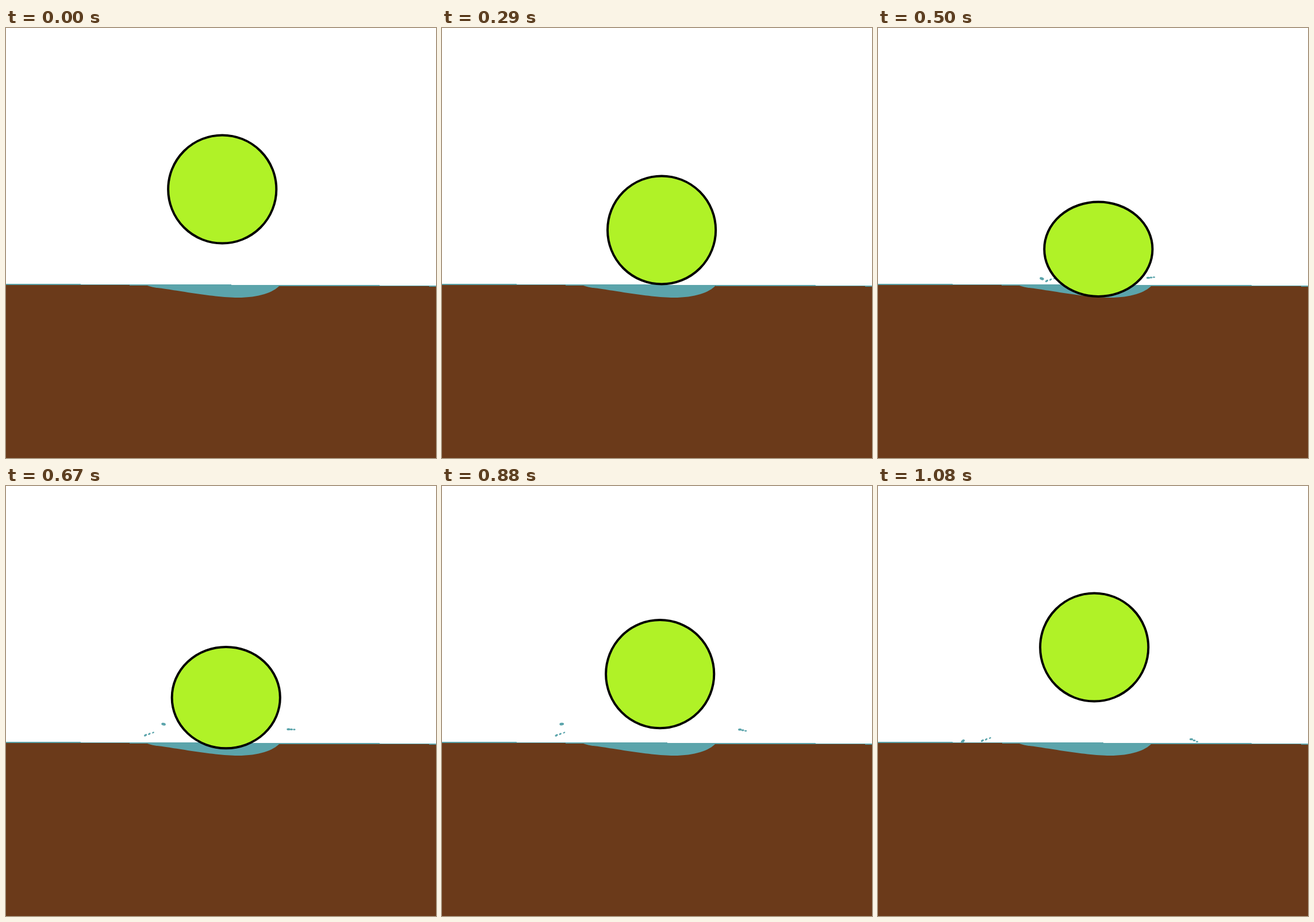
These frames come from a looping animation (748x748 px, 1120 ms). An HTML page:

```html
<!DOCTYPE html>
<html lang="en">
<head>
<meta charset="utf-8">
<title>Bouncing ball</title>
<style>
  html, body { margin: 0; width: 100%; height: 100%; overflow: hidden; background: #fff; }
  svg { display: block; width: 100vw; height: 100vh; }
  .water { fill: #5ba4ab; }
  .soil { fill: #6b3a1a; }
</style>
</head>
<body>
<svg viewBox="0 0 748 748">
  <g id="drops" class="water"></g>
  <g shape-rendering="crispEdges">
    <path class="soil" d="M0 446.68L748 449.56V748H0Z"/>
    <path class="water" d="M0 445L748 447.88V449.56L0 446.68Z"/>
  </g>
  <path class="water" d="M243 447Q252 450.5 262 452C276 452.5 360 469 403 469C440 469 465 460 476 448Z"/>
  <ellipse id="ball" rx="94.1" fill="#b0f227" stroke="#000" stroke-width="4"/>
</svg>
<script>
const LOOP = 1120, LAST = 26, MID = 13, SPLASH = 12;
const ball = document.getElementById('ball');
const layer = document.getElementById('drops');
const lerp = (a, b, u) => a + (b - a) * u;
const clamp = u => Math.min(1, Math.max(0, u));
const smooth = u => u * u * (3 - 2 * u);

function set(el, attrs) {
  for (const name in attrs) el.setAttribute(name, attrs[name]);
}

// Each spray is a row of drops thrown along an arc; gap, rise and sag space the row.
const sprays = [
  { count: 1, from: [285, 436], to: [147.5, 444], height: 29.5, size: 3.9,
    ease: u => smooth(u ** 1.4), tilt: u => 20 - 60 * u * u },
  { count: 3, from: [293.5, 440], to: [181.5, 443], height: 9, size: 2.9, gap: 6.7, rise: -2.3, sag: 0,
    ease: u => 1 - (1 - u) ** 1.8, tilt: () => -30 },
  { count: 3, from: [470, 434.5], to: [545, 440.5], height: 16, size: 3.1, gap: 5, rise: -.5, sag: 2.6,
    ease: u => u, tilt: () => 0 }
];

for (const s of sprays) {
  s.dots = Array.from({ length: s.count }, (_, i) => {
    const dot = document.createElementNS('http://www.w3.org/2000/svg', 'ellipse');
    const rx = s.size * .83 ** i;
    set(dot, { rx, ry: rx * .6 });
    return layer.appendChild(dot);
  });
}

// 24 steps per second, held on a 10 ms clock
const startOf = step => Math.round(step * 25 / 6) * 10;

function stepAt(ms) {
  let step = LAST;
  while (step > 0 && startOf(step) > ms) step--;
  return step;
}

function drawBall(step) {
  const depth = MID - Math.abs(MID - step);
  const fall = Math.min(depth, 7);
  const squash = clamp((depth - 8) / 4);
  set(ball, {
    cx: 376.2 + .12 * fall * fall + 1.3 * squash,
    cy: 280.5 + 7.27 * fall + .41 * fall * fall + 33.2 * squash,
    ry: lerp(94.1, 82.2, squash)
  });
}

function drawDrops(step) {
  layer.style.display = step < SPLASH ? 'none' : '';
  const u = clamp((step - SPLASH) / (LAST - SPLASH));
  for (const s of sprays) {
    const x = lerp(s.from[0], s.to[0], s.ease(u));
    const y = lerp(s.from[1], s.to[1], u) - s.height * 4 * u * (1 - u);
    s.dots.forEach((dot, i) => {
      const dx = i && i * s.gap;
      const dy = i && i * (s.rise + s.sag * u);
      set(dot, { transform: `translate(${x + dx} ${y + dy}) rotate(${s.tilt(u)})` });
    });
  }
}

const begin = performance.now();

function draw(now) {
  const step = stepAt(Math.max(0, now - begin) % LOOP);
  drawBall(step);
  drawDrops(step);
  requestAnimationFrame(draw);
}
draw(begin);
</script>
</body>
</html>
```
